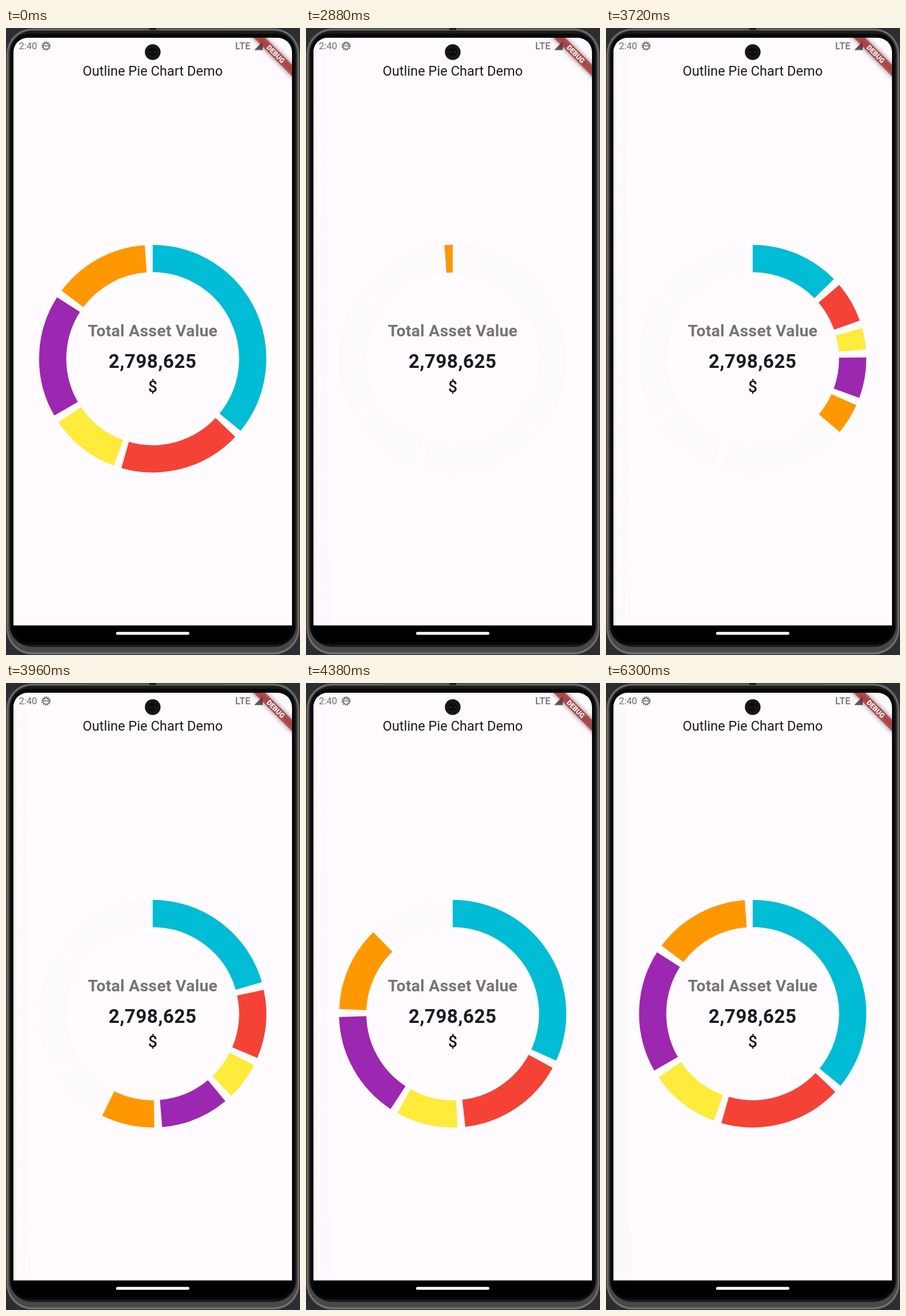
Write an HTML page that moves like this. It is 513 by 1092 pixels and loops after 6.36 s.

```html
<!DOCTYPE html>
<html lang="en">
<head>
<meta charset="utf-8">
<title>Outline Pie Chart Demo</title>
<style>
  html, body { margin: 0; width: 100%; height: 100%; overflow: hidden; background: #2b2d32; }
  svg { display: block; width: 100%; height: 100%; }
  text { font-family: Roboto, sans-serif; fill: #1c1b1f; }
  .mid { text-anchor: middle; }
  .status { font-size: 16.5px; fill: #706d71; }
  .title { font-size: 23.63px; }
  .label { font-size: 28.35px; font-weight: 700; letter-spacing: .25px; fill: #757476; }
  .value { font-size: 33.08px; font-weight: 700; letter-spacing: .5px; }
  .unit { font-size: 28.35px; font-weight: 500; }
  .debug { font-size: 12px; font-weight: 900; fill: #fff; }
  #track path, #ring path { fill: none; }
  #track path { stroke: #fdfafb; stroke-width: 49.5; }
  #ring path { stroke-width: 47.5; }
</style>
</head>
<body>
<svg viewBox="0 0 513 1092">
  <defs>
    <clipPath id="screen"><rect x="13" y="17" width="486" height="1053" rx="25"/></clipPath>
    <linearGradient id="shade">
      <stop stop-color="#f9f4f8"/><stop offset=".3" stop-color="#fdf9fd"/><stop offset="1" stop-color="#fbfafd"/>
    </linearGradient>
    <filter id="blur" x="-20%" y="-150%" width="140%" height="400%"><feGaussianBlur stdDeviation="4.7"/></filter>
  </defs>

  <!-- phone body, from the rim inwards -->
  <rect width="513" height="1092" rx="46" fill="#3f3f40"/>
  <rect x="1.5" y="1.5" width="510" height="1089" rx="44" fill="#747474"/>
  <rect x="3.5" y="3.5" width="506" height="1084" rx="42" fill="#484848"/>
  <rect x="6" y="5" width="501" height="1073" rx="39" fill="#1b1b1b"/>
  <rect x="8" y="10" width="496" height="1064" rx="31" fill="#080808"/>
  <path d="M132 1.5H250M262 1.5H384" stroke="#555" stroke-width="2"/>
  <path d="M250 1.5H262" stroke="#1b1b1b" stroke-width="4"/>

  <g clip-path="url(#screen)">
    <rect x="13" y="17" width="486" height="1053"/>
    <rect x="13" y="17" width="486" height="1023.5" fill="#fffbff"/>
    <path id="strip" d="M13 17H35L43 1040H13z"/>
    <rect x="192" y="1051.8" width="128" height="5" rx="2.5" fill="#fff"/>

    <!-- status bar -->
    <text class="status" x="22.5" y="37">2:40</text>
    <g transform="translate(70 31.3)" fill="none" stroke="#706d71">
      <circle r="7.2" stroke-width="1.8" stroke-dasharray="1.9 1.87"/>
      <circle r="5.6" stroke-width="1.7"/>
      <path d="M-5 0H5M-2-5V-2M2-5V-2" stroke-width="1.6"/>
    </g>
    <text class="status" x="400" y="37" font-weight="500">LTE</text>
    <path d="M433 38.5L448 23.5V38.5z" fill="#5f5c60"/>

    <g transform="translate(499 17) rotate(45)">
      <rect x="-60" y="33.1" width="120" height="14.2" opacity=".5" filter="url(#blur)"/>
      <rect x="-60" y="33.1" width="120" height="14.2" fill="#b71c1c" fill-opacity=".627"/>
      <text class="debug mid" y="44.4">DEBUG</text>
    </g>

    <circle cx="256" cy="42" r="13.7" fill="#171719"/>
    <circle cx="256" cy="42" r="7.5" fill="#0d0c0c"/>
    <g fill="#4a4037"><circle cx="251.5" cy="42.2" r="1.1"/><circle cx="260" cy="42.2" r="1.1"/></g>

    <text class="title mid" x="256" y="83">Outline Pie Chart Demo</text>
    <g id="track"></g>
    <g id="ring"></g>
    <text class="label mid" x="256" y="537">Total Asset Value</text>
    <text class="value mid" x="255.7" y="592.4">2,798,625</text>
    <text class="unit mid" x="256" y="633.6">$</text>
  </g>
</svg>
<script>
const LOOP = 6360, TICK = 60, SPIN_START = 2880, SPIN_DELAY = 20, SPIN_LENGTH = 1930;
const CX = 255.95, CY = 575.9, RADIUS = 174.5, GAP = 4;
const SHARES = [10, 5, 3, 5, 4];
const COLORS = ['#00bcd4', '#f44336', '#ffeb3b', '#9c27b0', '#ff9800'];

const total = SHARES.reduce((sum, share) => sum + share);
let sum = 0;
const bounds = [0, ...SHARES.map(share => (sum += share) * 360 / total)];

const byId = id => document.getElementById(id);
const strip = byId('strip'), track = byId('track');

const addPaths = parent => COLORS.map(color => {
  const path = document.createElementNS('http://www.w3.org/2000/svg', 'path');
  path.setAttribute('stroke', color);
  return parent.appendChild(path);
});

// Degrees run clockwise from the top.
function point(degrees) {
  const a = degrees * Math.PI / 180;
  return `${(CX + RADIUS * Math.sin(a)).toFixed(3)} ${(CY - RADIUS * Math.cos(a)).toFixed(3)}`;
}

// The gap is taken off each sweep, so tiny segments run backwards.
function placeSegments(paths, progress) {
  paths.forEach((path, i) => {
    const from = bounds[i] * progress, to = bounds[i + 1] * progress - GAP;
    path.setAttribute('d', `M${point(from)}A${RADIUS} ${RADIUS} 0 0 ${to > from ? 1 : 0} ${point(to)}`);
  });
}

// Bezier ease-in-out (.42, 0, .58, 1), solved for x by bisection.
function easeInOut(x) {
  if (x <= 0) return 0;
  if (x >= 1) return 1;
  let low = 0, high = 1;
  for (let i = 0; i < 24; i++) {
    const s = (low + high) / 2;
    if (s * (1.26 + s * (0.52 * s - 0.78)) < x) low = s; else high = s;
  }
  return low * low * (3 - 2 * low);
}

const segments = addPaths(byId('ring'));
placeSegments(addPaths(track), 1);

function draw(now) {
  const time = Math.floor((now % LOOP) / TICK) * TICK;
  const spinning = time >= SPIN_START;
  placeSegments(segments, spinning ? easeInOut((time - SPIN_START - SPIN_DELAY) / SPIN_LENGTH) : 1);
  track.style.display = spinning && time < 4860 ? '' : 'none';
  strip.style.display = time < 960 ? 'none' : '';
  strip.style.fill = time < 6300 ? 'url(#shade)' : '#fafaf9';
}

const start = performance.now();
function frame() {
  draw(performance.now() - start);
  requestAnimationFrame(frame);
}
frame();
</script>
</body>
</html>
```
